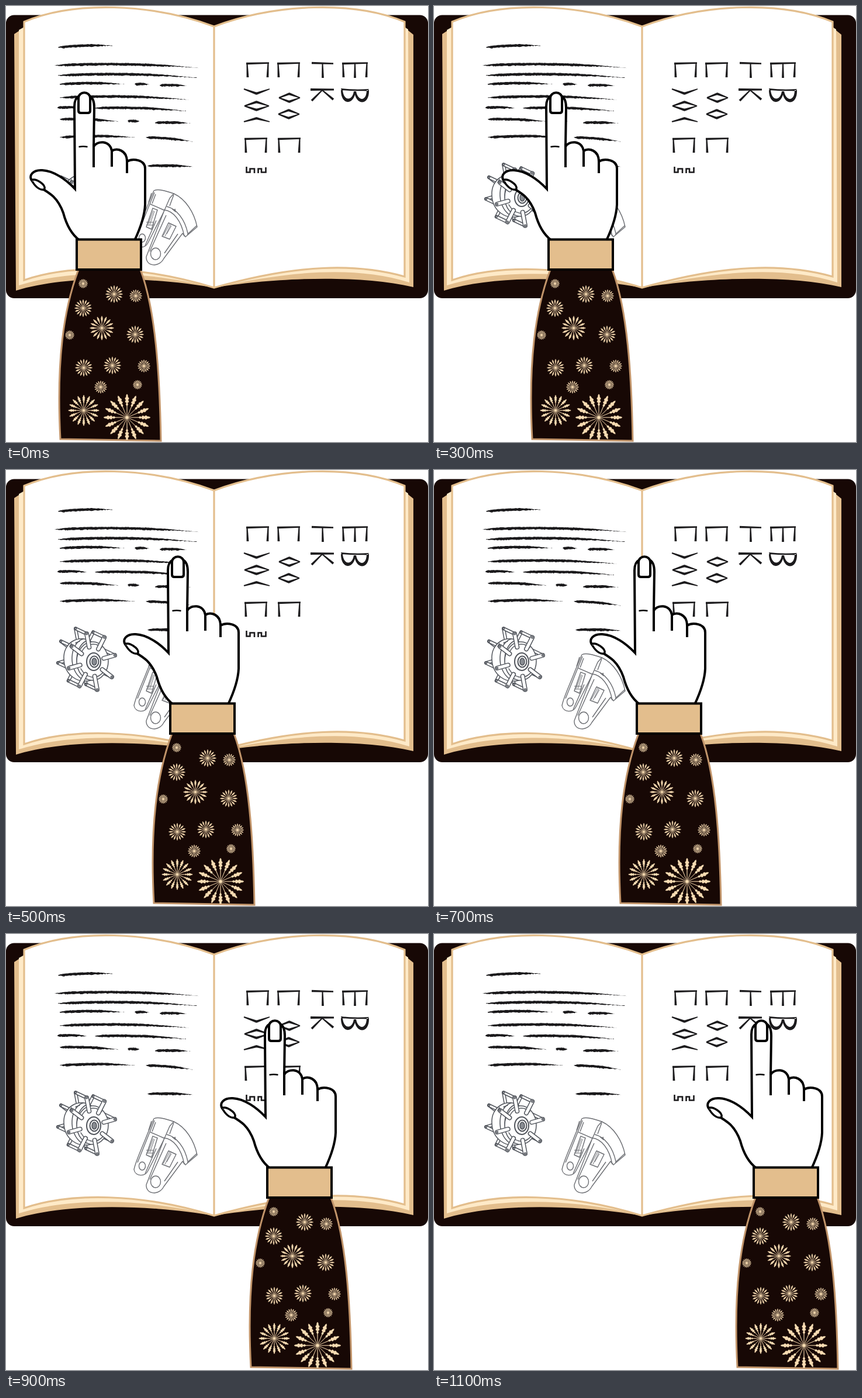
Recreate the animation shown at these times as an HTML page. Size 722x746 px, loop 1200 ms.

```html
<!DOCTYPE html>
<html lang="en">
<head>
<meta charset="utf-8">
<title>Reading hand</title>
<style>
html, body { margin: 0; width: 100%; height: 100%; overflow: hidden; background: #fff; }
svg { display: block; }
</style>
</head>
<body>
<svg width="722" height="746" viewBox="0 0 722 746" fill="none">
  <defs>
    <clipPath id="inSleeve"><path d="M124 451C98 520 86 610 93 741L265 743C263 630 256 520 230 451Z"/></clipPath>
    <g id="flower" fill="#f8dcb3"><circle r="2.600"/></g>
  </defs>

  <g id="book">
    <rect y="15.500" width="722" height="484.500" rx="14" fill="#170805"/>
    <path fill="#e3be8d" d="M14 48L31 37H682L697 49V481C600 458 450 466 356 482C260 465 110 458 17 487Z"/>
    <path fill="#feeac8" d="M22 41L31 36H682L688 40L690 473C600 445 490 452 356 482C240 452 110 450 22 478Z"/>
    <path fill="#fff" stroke="#e3be8d" stroke-width="3.200" d="M31 27C116 -9 248 -5 356 35C464 -5 596 -9 682 27V463C600 440 500 441 356 482C230 443 110 442 31 469ZM356 35V482"/>
  </g>

  <g id="lines" fill="#1b1a1c"></g>
  <g id="glyphs" fill="#1b1a1c">
    <path d="M573 141Q597 144 621 142L619 145Q597 146 574 144ZM573 144C573 171 596 170 598 146L595 146C593 162 578 164 576 144ZM596 146C598 171 622 171 621 144L617 144C617 164 602 163 599 146Z"/>
    <path fill="none" stroke="#1b1a1c" stroke-width="2.600" d="M411.500 275V284.500H417.500V278.500H425V286M431.500 286V278.500H437V284.500H444.500V276"/>
  </g>

  <g id="wheel" stroke="#50545b" stroke-width="1.500" stroke-linecap="round">
    <g id="backLinks"></g>
    <path fill="#fff" d="M146 294C124 280 97 296 99 324C100 350 122 366 145 360"/>
    <path d="M132 289C109 296 105 341 130 358M138 292C116 303 115 342 138 358M109 302l3 -5M119 296l7 -3"/>
    <ellipse cx="148" cy="327" rx="27" ry="33" fill="#fff"/>
    <path d="M130 310C137 297 153 294 164 304M128 340C137 356 155 361 168 344"/>
    <ellipse cx="150" cy="328" rx="12" ry="15" fill="#fff" stroke-width="2"/>
    <ellipse cx="151" cy="328" rx="7.500" ry="9.500" stroke-width="2"/>
    <ellipse cx="151" cy="328" rx="4" ry="6" fill="#888c92"/>
    <g id="frontLinks"></g>
  </g>

  <g id="blades" stroke="#6c6e73" stroke-width="1.400" stroke-linejoin="round">
    <path fill="#fff" d="M253 316C260 312 275 317 287 321L270 352L243 405C238 416 221 415 219 403C222 388 232 368 242 342Z"/>
    <path d="M247 339L272 350M225 391L254 319M249 320L244 336M256 322L250 338M238 410L257 367"/>
    <path fill="#fff" d="M240 429L270 352L280 329L287 321C307 330 322 353 327 378L307 395L302 389L270 432C262 448 239 446 240 429Z"/>
    <path d="M270 349C286 350 300 367 305 394M275 343C292 347 306 365 311 389M287 323L280 342M246 420L274 358M294 390L271 423M310 391L326 376M284 347l6 5l-1 -5"/>
    <path d="M267 394L278 371L291 377L280 399ZM240 378L251 346L259 349L249 382Z"/>
    <path stroke-width="1" d="M269 393L280 373M272 394L282 374M275 390L283 376M243 374L252 350M246 374L254 351M240 370h12v5h-12"/>
    <ellipse cx="256" cy="424" rx="8.500" ry="10"/>
    <ellipse cx="233" cy="397" rx="5.500" ry="7"/>
  </g>

  <g id="arm">
    <path fill="#170805" stroke="#c1946a" stroke-width="3" d="M124 451C98 520 86 610 93 741L265 744C263 630 256 520 230 451Z"/>
    <g id="flowers" clip-path="url(#inSleeve)"></g>
    <g stroke="#000" stroke-width="4">
      <path fill="#fff" d="M126 401C111 390 103 373 98 354C84 315 59 316 46 301C36 290 47 280 62 281C82 282 103 297 118 313L117 172C117 163 119 157 125 154H143C149 157 151 165 151 174L150 241C155 230 178 229 181 248C190 242 207 247 207 266C217 260 238 263 238 278V340C237 363 228 384 220 401"/>
      <path d="M150 236V276M181 246V275M207 262V286"/>
      <path fill="#fff" d="M124 158C124 145 144 145 144 158V179Q144 183 140 183H128Q124 183 124 179Z"/>
      <path fill="#fff" stroke-width="3.400" d="M44 298C50 294 68 305 66 313C61 317 51 311 45 300"/>
      <path stroke-width="2.400" d="M124.500 241Q132 239.500 139.500 241"/>
      <rect x="121" y="399.500" width="110" height="51.500" fill="#e3be8d"/>
    </g>
  </g>
</svg>
<script>
const $ = id => document.getElementById(id);
const add = (id, html) => $(id).insertAdjacentHTML('beforeend', html);

let seed = 7;
const rand = () => (seed = seed * 16807 % 2147483647) / 2147483647;

// Ragged, tapering brush stroke; longer strokes bow and sink more
function brush(x, y, length, drop = length / 60) {
  const top = [], bottom = [];
  for (let d = 0; d <= length; d += 2) {
    const u = d / length, mid = y + drop * u - length / 15 * u * (1 - u);
    const half = 2.7 * Math.min(1, .3 + u * 8, .12 + (1 - u) * 2.4);
    top.push(`${x + d},${mid - half + rand() * .7}`);
    bottom.unshift(`${x + d + rand()},${mid + half - rand() * 1.3}`);
  }
  add('lines', `<polygon points="${top.concat(bottom).join(' ')}"/>`);
}
brush(89, 71, 94, -3);
brush(83, 102, 247);
brush(89, 119, 238);
brush(92, 134, 111, 0);
brush(220, 134, 25);
brush(263, 136, 46);
brush(92, 157, 221);
brush(88, 174, 50);
brush(152, 175, 156, 5);
brush(92, 194, 101, 4);
brush(208, 197, 21);
brush(255, 200, 60);
brush(92, 225, 128, 0);
brush(239, 225, 80, 7);
brush(242, 274, 79);

// Straight pen stroke that widens from a to b
function pen(x1, y1, x2, y2, a = 2, b = 3.8) {
  const d = Math.hypot(x2 - x1, y2 - y1) * 2;
  const nx = (y1 - y2) / d, ny = (x2 - x1) / d;
  add('glyphs', `<polygon points="${x1 + nx * a},${y1 + ny * a} ${x2 + nx * b},${y2 + ny * b} ${x2 - nx * b},${y2 - ny * b} ${x1 - nx * a},${y1 - ny * a}"/>`);
}
function gate(x, y, w = 39) {
  pen(x, y + 1.5, x + w, y + .5, 3.5, 2.5);
  pen(x + 1.5, y + 1, x + 2.5, y + 25);
  pen(x + w - 1.5, y, x + w - 2.5, y + 25);
}
function chevron(x, y, w, dip) {
  pen(x, y, x + w / 2, y + dip, 2.2, 4);
  pen(x + w, y, x + w / 2 - 1, y + dip, 1.6, 4);
}
function diamond(x, y, w) {
  chevron(x, y, w, -7);
  chevron(x, y, w, 7);
}
gate(411, 97);
gate(464, 97);
gate(408, 226);
gate(465, 226);
gate(575, 97, 44);
pen(597, 98, 597, 123);
pen(523, 97.5, 560, 98.500, 3.5, 2.5);
pen(541.500, 98, 542, 123);
pen(521, 143, 561, 143, 4, 3);
pen(541, 144, 523, 162);
pen(541, 144, 560, 160);
chevron(407, 142, 44, 8);
diamond(408, 171, 42);
chevron(407, 198, 44, -6);
diamond(467, 157, 36);
diamond(466, 185, 36);

// Hinged bar with a pin at its far end
function link(group, x1, y1, x2, y2, w) {
  const d = `M${x1} ${y1}L${x2} ${y2}`;
  add(group, `<path d="${d}" stroke-width="${w}"/><path d="${d}" stroke="#fff" stroke-width="${w - 3}"/><circle cx="${x2}" cy="${y2}" r="1.500"/>`);
}
// Eight paddles: an arm on the front disc, one on the back disc, a bar between
for (let i = 0; i < 8; i++) {
  const angle = (i * 45 - 13) * Math.PI / 180;
  const dx = 40 * Math.cos(angle), dy = 49 * Math.sin(angle);
  const x = 147 + dx, y = 328 + dy, backX = x - 19, backY = y - 9;
  link('backLinks', backX - dx * .4, backY - dy * .4, backX, backY, 6);
  link('backLinks', x, y, backX, backY, 6);
  link('frontLinks', x - dx * .48, y - dy * .48, x, y, 8);
}

// Sixteen ears of grain around a centre
for (let i = 0; i < 16; i++) {
  add('flower', `<path transform="rotate(${i * 22.5})" stroke="#f8dcb3" stroke-width=".5" vector-effect="non-scaling-stroke" d="M0 0L-.3 -20Q-3 -22 -.5 -25Q-5 -26 -1.500 -30Q-5 -32 -1.500 -35Q-2 -38 0 -40Q2 -38 1.500 -35Q5 -32 1.500 -30Q5 -26 .5 -25Q3 -22 .3 -20Z"/>`);
}
const bloom = (r, ...spots) => spots.forEach(([x, y]) =>
  add('flowers', `<use href="#flower" transform="translate(${x} ${y}) scale(${r / 41})"/>`));
bloom(8, [132, 475], [109, 563], [225, 648]);
bloom(11, [222, 496], [236, 616], [162, 652]);
bloom(15, [185, 493], [132, 517], [221, 562], [133, 619], [182, 615]);
bloom(21, [164, 551]);
bloom(27, [133, 692]);
bloom(41, [207, 704]);

// The hand jumps every 100 ms along straight runs between these [step, x] points
const path = [[0, 0], [2, 40], [4, 110], [5, 160], [6, 190], [7, 226], [11, 426]];
function handX(step) {
  const next = Math.max(1, path.findIndex(([s]) => s >= step));
  const [s0, x0] = path[next - 1], [s1, x1] = path[next];
  return x0 + (x1 - x0) * (step - s0) / (s1 - s0);
}
function draw() {
  const step = Math.floor(performance.now() % 1200 / 100);
  $('arm').setAttribute('transform', `translate(${handX(step)})`);
  requestAnimationFrame(draw);
}
draw();
</script>
</body>
</html>
```
